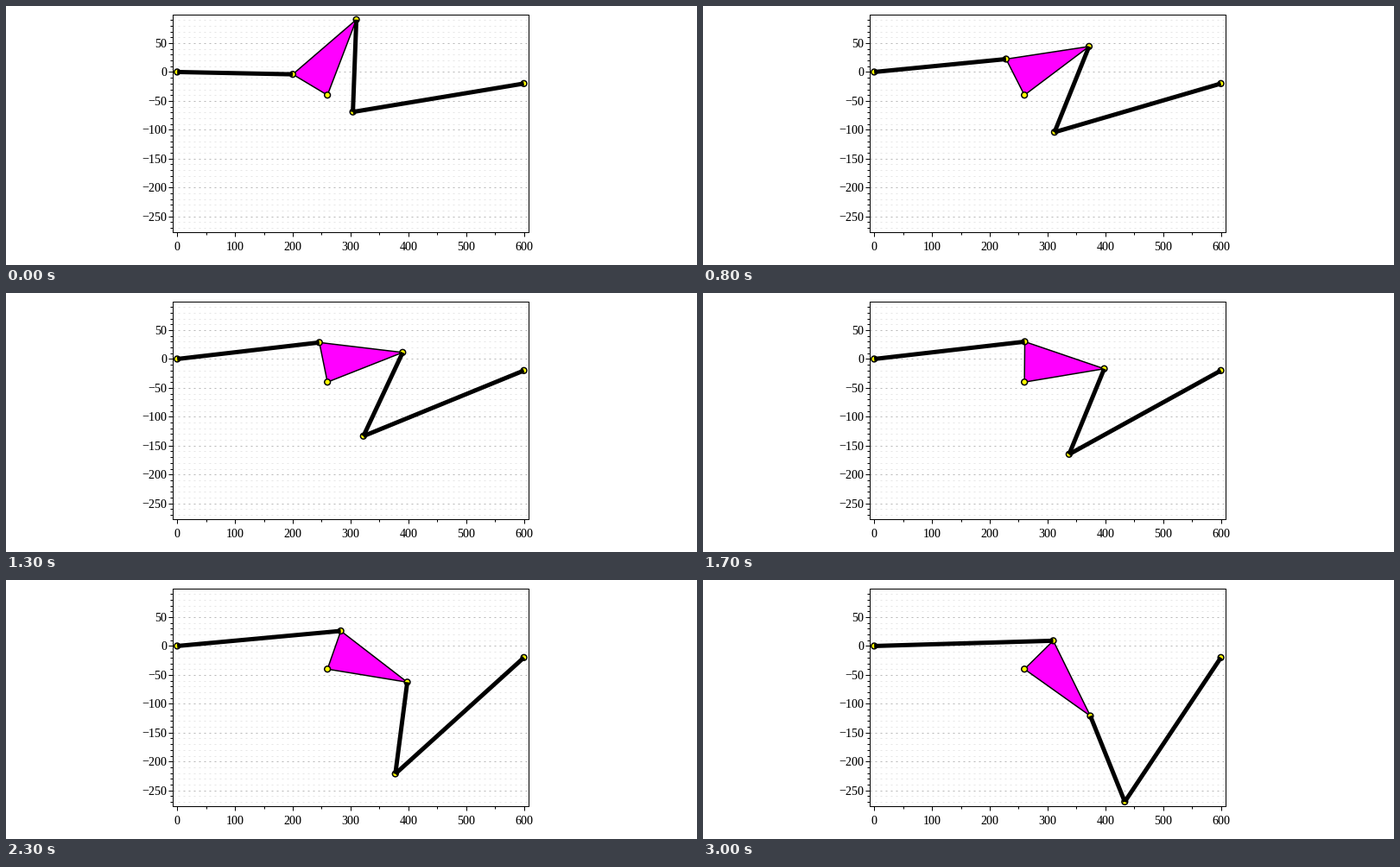
Write a matplotlib script that moves like this. It is 800x300 px and loops after 3.1 s.

```python
import matplotlib.pyplot as plt
import numpy as np
from matplotlib.animation import FuncAnimation
from matplotlib.patches import Circle, Polygon
from matplotlib.ticker import MultipleLocator

W, H, DPI = 800, 300, 100
PX = 72 / DPI                    # points per pixel
FRAMES, INTERVAL = 31, 100

# plot box and data origin in pixels (y downwards), pixels per unit
LEFT, RIGHT, TOP, BOTTOM = 193, 605, 10, 262
X0, Y0, SCALE = 198.2, 76.45, 0.669

# linkage: fixed points, link lengths and the plate's opening angle
BASE = np.array([0.0, 0.0])
PIVOT = np.array([260.0, -40.0])
ANCHOR = np.array([600.0, -20.0])
SHORT_ARM, LONG_ARM, PLATE_ANGLE = 70, 140, np.radians(80)
ROD, CRANK = 160, 300
STROKE = 200, 310

# full hinting with whole-pixel advances for the labels
plt.rcParams.update({
    "font.family": "Liberation Serif",
    "font.size": 15 * PX,
    "text.hinting": "native",
    "text.hinting_factor": 1,
})


def meet(p, rp, q, rq, side):
    """Crossing of two circles, on the left (+1) or right (-1) of p to q."""
    d = np.hypot(*(q - p))
    u = (q - p) / d
    along = (rp**2 - rq**2 + d**2) / (2 * d)
    across = np.sqrt(rp**2 - along**2)
    return p + along * u + side * across * np.array([-u[1], u[0]])


def pose(frame):
    reach = np.interp(frame, (0, FRAMES - 1), STROKE)
    b = meet(BASE, reach, PIVOT, SHORT_ARM, 1)
    angle = np.arctan2(*(b - PIVOT)[::-1]) - PLATE_ANGLE
    c = PIVOT + LONG_ARM * np.array([np.cos(angle), np.sin(angle)])
    d = meet(c, ROD, ANCHOR, CRANK, -1)
    return b, c, d


fig = plt.figure(figsize=(W / DPI, H / DPI), dpi=DPI, facecolor="white")
ax = fig.add_axes([LEFT / W, 1 - BOTTOM / H, (RIGHT - LEFT) / W, (BOTTOM - TOP) / H])
ax.set_xlim((LEFT - X0) / SCALE, (RIGHT - X0) / SCALE)
ax.set_ylim((Y0 - BOTTOM) / SCALE, (Y0 - TOP) / SCALE)
ax.set_axisbelow(True)

ax.xaxis.set_major_locator(MultipleLocator(100))
ax.xaxis.set_minor_locator(MultipleLocator(50))
ax.yaxis.set_major_locator(MultipleLocator(50))
ax.yaxis.set_minor_locator(MultipleLocator(10))
ax.tick_params(which="major", length=5 * PX, width=PX)
ax.tick_params(which="minor", length=3 * PX, width=PX)
ax.tick_params(axis="x", which="major", pad=6 * PX)
ax.tick_params(axis="y", which="major", pad=1.5 * PX)
for spine in ax.spines.values():
    spine.set_linewidth(PX)

for which, color in (("minor", "#e6e6e6"), ("major", "#b8b8b8")):
    ax.grid(axis="y", which=which, color=color, linewidth=PX,
            linestyle=(0, (2, 4)))

plate = ax.add_patch(Polygon(np.zeros((3, 2)), facecolor="magenta",
                             edgecolor="black", linewidth=1.5 * PX, zorder=3))
joints = [ax.add_patch(Circle((0, 0), 3.4 / SCALE, facecolor="yellow",
                              edgecolor="black", linewidth=1.5 * PX, zorder=4))
          for _ in range(6)]
bars = [ax.plot([], [], color="black", linewidth=5 * PX,
                solid_capstyle="butt", zorder=5)[0] for _ in range(3)]


def update(frame):
    b, c, d = pose(frame)
    plate.set_xy([b, c, PIVOT])
    for joint, point in zip(joints, (BASE, b, c, PIVOT, d, ANCHOR)):
        joint.set_center(point)
    for bar, ends in zip(bars, ((BASE, b), (c, d), (d, ANCHOR))):
        bar.set_data(*np.transpose(ends))
    return [plate, *joints, *bars]


anim = FuncAnimation(fig, update, frames=FRAMES, interval=INTERVAL,
                     repeat=True, repeat_delay=0, blit=False)
plt.show()
```
